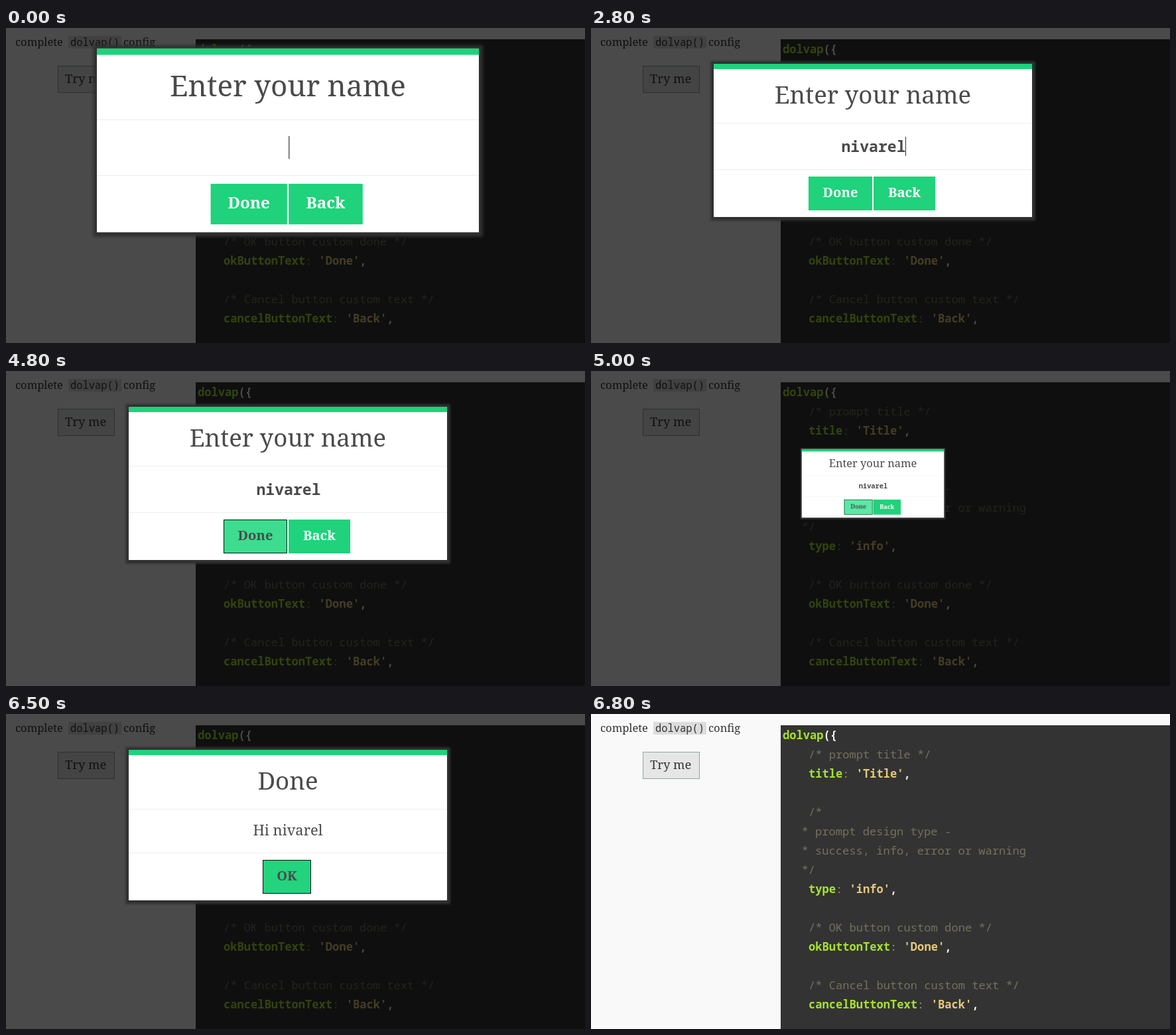
Animation, 873 px wide and 475 px high, one loop 8000 ms. Source, as an HTML page:

```html
<!DOCTYPE html>
<html lang="en">
<head>
<meta charset="utf-8">
<title>Prompt dialog demo</title>
<style>
  html, body { margin: 0; width: 100%; height: 100%; overflow: hidden; background: #f9f9f9; }
  svg { display: block; width: 873px; height: 475px; }
  text { white-space: pre; }

  .serif { font-family: "Noto Serif", serif; fill: #333; }
  .mono, .typed { font-family: "Noto Sans Mono", monospace; }
  .code { font-size: 17.1px; fill: #f8f8f2; font-weight: 600; }
  .key { fill: #a6e22e; }
  .str { fill: #e6c97a; }
  .colon { fill: #9a9a70; font-weight: 400; }
  .note { fill: #75715e; font-weight: 400; }

  .title, .message, .label { text-anchor: middle; }
  .title, .message { fill: #4a4a4a; }
  .title { font-size: 36.7px; }
  .message { font-size: 21.9px; }
  .label { font-size: 20.2px; font-weight: 900; fill: #fff; }
  .dark { fill: #4a4a4a; }
  .green { fill: #1fd27b; }
  .light { fill: #5de8a6; }
  .rule { fill: #eee; }
  .focus { fill: none; stroke: #111; }
  .shadow { fill: #303030; filter: blur(1.6px); }

  .field { display: flex; justify-content: center; height: 29px; }
  .typed {
    flex: none; overflow: hidden; white-space: nowrap; margin-right: -1px;
    border-right: 1px solid #333; color: #4a4a4a;
    font-size: 23.1px; font-weight: 700; line-height: 29px;
  }

  .shade, .dialog, .typed, .hover, .press, .ring { animation: 8s step-end infinite; }
  .shade { animation-name: shade; }
  .ask { transform-origin: 425px 169.5px; animation-name: ask; }
  .reply { transform-origin: 425px 167.5px; animation-name: reply; }
  .typed { animation-name: type, blur; }
  .ring { animation-name: ring; }
  .ask .hover { animation-name: ask-hover; }
  .ask .press { animation-name: ask-press; }
  .reply .hover { animation-name: reply-hover; }
  .reply .press { animation-name: reply-press; }

  /* 1.25% is 100 ms */
  @keyframes shade { 0% { opacity: .7 } 85%, 100% { opacity: 0 } }
  @keyframes ask {
    0% { transform: scale(1.2) }
    1.25% { transform: scale(1.04) }
    2.5% { transform: scale(1) }
    61.25% { transform: scale(.97) }
    62.5% { transform: scale(.447) }
    63.75% { transform: scale(.08) }
    65%, 100% { transform: scale(0) }
  }
  @keyframes reply {
    0% { transform: scale(0) }
    65% { transform: scale(1.16) }
    66.25% { transform: scale(1.031) }
    67.5% { transform: scale(1.008) }
    68.75% { transform: scale(1) }
    82.5% { transform: scale(.45) }
    83.75% { transform: scale(.07) }
    85%, 100% { transform: scale(0) }
  }
  @keyframes type {
    0% { width: 0 }
    16.25% { width: 1ch }
    18.75% { width: 2ch }
    22.5% { width: 3ch }
    23.75% { width: 4ch }
    28.75% { width: 5ch }
    30% { width: 6ch }
    35%, 100% { width: 7ch }
  }
  @keyframes blur { 0% { border-color: #333 } 58.75%, 100% { border-color: transparent } }
  @keyframes ring { 0% { opacity: 0 } 58.75%, 100% { opacity: 1 } }
  @keyframes ask-hover {
    0% { opacity: 0 }
    51.25% { opacity: .3 }
    52.5% { opacity: .78 }
    53.75%, 100% { opacity: 1 }
  }
  @keyframes ask-press {
    0% { opacity: 0 }
    58.75% { opacity: .3 }
    60% { opacity: .5 }
    61.25% { opacity: .2 }
    62.5%, 100% { opacity: 0 }
  }
  @keyframes reply-hover {
    0% { opacity: 0 }
    66.25% { opacity: .33 }
    67.5% { opacity: .8 }
    68.75%, 100% { opacity: 1 }
  }
  @keyframes reply-press {
    0% { opacity: 0 }
    72.5% { opacity: .2 }
    73.75% { opacity: .6 }
    75% { opacity: .9 }
    76.25% { opacity: 1 }
    80% { opacity: .97 }
    81.25% { opacity: .92 }
    82.5%, 100% { opacity: .5 }
  }
</style>
</head>
<body>
<svg viewBox="0 0 873 475">
  <rect width="873" height="475" fill="#f9f9f9"/>
  <g class="serif" font-size="16.5">
    <text x="14" y="27">complete</text>
    <text x="177" y="27">config</text>
    <rect x="94" y="12" width="80" height="19" fill="#dcdcdc"/>
    <rect x="78.5" y="57.5" width="85" height="40" fill="#e6e6e6" stroke="#8fa59c"/>
    <text x="89" y="83" font-size="18.4">Try me</text>
  </g>
  <text class="mono" x="97" y="27" font-size="15.4" fill="#333">dolvap()</text>

  <rect x="286" y="17" width="587" height="458" fill="#333"/>
  <g class="mono code">
    <text x="289" y="38"><tspan class="key">dolvap</tspan>({</text>
    <text x="328" y="67" class="note">/* prompt title */</text>
    <text x="328" y="96"><tspan class="key">title</tspan><tspan class="colon">:</tspan> <tspan class="str">'Title'</tspan>,</text>
    <text x="328" y="154" class="note">/*</text>
    <text x="317.5" y="183" class="note">* prompt design type -</text>
    <text x="317.5" y="212" class="note">* success, info, error or warning</text>
    <text x="317.5" y="241" class="note">*/</text>
    <text x="328" y="270"><tspan class="key">type</tspan><tspan class="colon">:</tspan> <tspan class="str">'info'</tspan>,</text>
    <text x="328" y="328" class="note">/* OK button custom done */</text>
    <text x="328" y="357"><tspan class="key">okButtonText</tspan><tspan class="colon">:</tspan> <tspan class="str">'Done'</tspan>,</text>
    <text x="328" y="415" class="note">/* Cancel button custom text */</text>
    <text x="328" y="444"><tspan class="key">cancelButtonText</tspan><tspan class="colon">:</tspan> <tspan class="str">'Back'</tspan>,</text>
  </g>

  <rect class="shade" width="873" height="475"/>

  <g class="dialog ask">
    <rect class="shadow" x="180.5" y="50" width="489.5" height="240.5"/>
    <rect x="185" y="54" width="480" height="231" fill="#fff"/>
    <rect class="green" x="185" y="54" width="480" height="8"/>
    <rect class="rule" x="185" y="143" width="480" height="1"/>
    <rect class="rule" x="185" y="213" width="480" height="1"/>
    <text class="serif title" x="425" y="114">Enter your name</text>
    <foreignObject x="186" y="164" width="480" height="29">
      <div class="field"><div class="typed">nivarel</div></div>
    </foreignObject>
    <rect class="green" x="328" y="224" width="96" height="51"/>
    <text class="serif label" x="376" y="255">Done</text>
    <g class="hover">
      <rect class="light" x="328" y="224" width="96" height="51"/>
      <rect class="green press" x="328" y="224" width="96" height="51"/>
      <text class="serif label dark" x="376" y="255">Done</text>
    </g>
    <rect class="focus ring" x="328.5" y="224.5" width="95" height="50"/>
    <rect class="green" x="426" y="224" width="93" height="51"/>
    <text class="serif label" x="472.5" y="255">Back</text>
  </g>

  <g class="dialog reply">
    <rect class="shadow" x="180.5" y="50" width="489.5" height="236.5"/>
    <rect x="185" y="54" width="480" height="227" fill="#fff"/>
    <rect class="green" x="185" y="54" width="480" height="8"/>
    <rect class="rule" x="185" y="143" width="480" height="1"/>
    <rect class="rule" x="185" y="209" width="480" height="1"/>
    <text class="serif title" x="425" y="114">Done</text>
    <text class="serif message" x="425" y="183">Hi nivarel</text>
    <rect class="green" x="387" y="220" width="73" height="51"/>
    <text class="serif label" x="423.5" y="251">OK</text>
    <g class="hover">
      <rect class="light" x="387" y="220" width="73" height="51"/>
      <rect class="green press" x="387" y="220" width="73" height="51"/>
      <text class="serif label dark" x="423.5" y="251">OK</text>
    </g>
    <rect class="focus" x="387.5" y="220.5" width="72" height="50"/>
  </g>
</svg>
</body>
</html>
```
